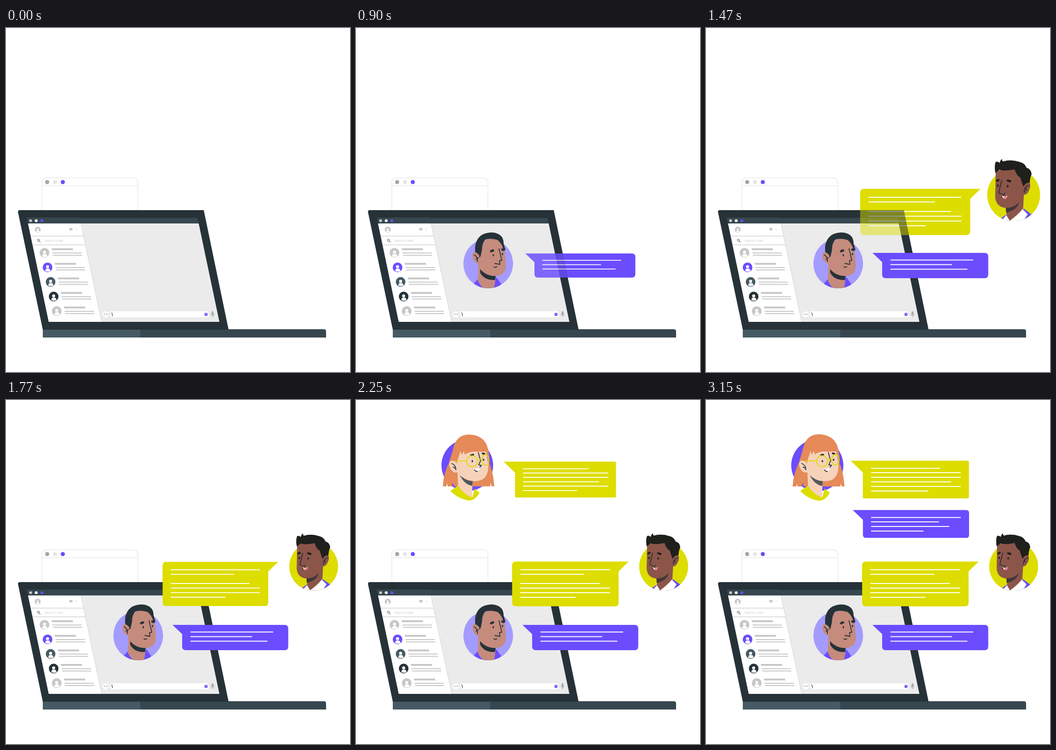
Write an HTML page that moves like this. It is 748 by 748 pixels and loops after 3.63 s.

```html
<!DOCTYPE html>
<html lang="en">
<head>
<meta charset="utf-8">
<title>Group chat</title>
<style>
  html, body { margin: 0; width: 100%; height: 100%; overflow: hidden; background: #fff; }
  svg { display: block; width: 100vw; height: 100vh; }
  .ink { fill: none; stroke: #263238; stroke-width: 1.8; stroke-linecap: round; stroke-linejoin: round; }
  .search { font: 7px "Open Sans", Lato, sans-serif; letter-spacing: .25px; fill: #c4c4c4; }
</style>
</head>
<body>
<svg viewBox="0 0 748 748">
  <defs>
    <clipPath id="lidClip"><path d="M26 400Q26 396 30 396H430L484 656H80Z"/></clipPath>
    <clipPath id="discA"><path d="M220 430H355V512H341.500A54 54 0 0 1 233.500 512H220Z"/></clipPath>
    <clipPath id="discB"><path d="M600 280H740V362H722A53 53 0 0 1 616 362H600Z"/></clipPath>

    <g id="faceA">
      <circle cx="287.500" cy="512" r="54" fill="#a49bff"/>
      <g clip-path="url(#discA)">
        <path d="M255 557L266 545L306 543L316 557L300 570H270Z" fill="#6b4dff"/>
        <path d="M266 508L265 549Q270 561 279 567H299Q303 557 303 547V528Z" fill="#c58b7c"/>
        <path d="M270 524Q282 539 304 539L302 548Q279 549 270 532Z" fill="#263238"/>
        <path d="M274 470Q283 455 305 457Q321 463 323 480L326 514Q327 536 307 539Q284 541 270 524L266 496Z" fill="#c58b7c"/>
        <path d="M260 492Q257 474 262 464Q270 445 295 444.500Q310 445 317 454Q321 460 321 469L325 482L321 485Q319 470 308 461Q293 456 281 460Q274 468 274 482L271 496L266 502Z" fill="#263238"/>
        <path d="M268 494Q261 486 255 488Q251 492 255 504Q260 513 268 512Z" fill="#c58b7c"/>
        <path class="ink" stroke-width="1.300" d="M257 493Q265 498 264 508M261 503L266 499"/>
        <path class="ink" d="M311 480L317 505L312 506L313 514L302 512"/>
        <path class="ink" stroke-width="1.300" d="M300 519Q303 522 306 519"/>
        <ellipse cx="296" cy="484.500" rx="4.800" ry="2.700" transform="rotate(-20 296 484.500)" fill="#263238"/>
        <ellipse cx="319.500" cy="482" rx="4" ry="2.500" transform="rotate(18 319.500 482)" fill="#263238"/>
        <ellipse cx="298.500" cy="494" rx="1.500" ry="2.500" fill="#263238"/>
        <ellipse cx="318.500" cy="491.500" rx="1.500" ry="2.500" fill="#263238"/>
      </g>
    </g>

    <g id="faceB">
      <circle cx="669" cy="362" r="53" fill="#dddd00"/>
      <g clip-path="url(#discB)">
        <path d="M642 410L656 400L690 390L706 402L690 418H650Z" fill="#6b4dff"/>
        <path d="M646 412L656 401L684 388L697 401L686 418H652Z" fill="#fff"/>
        <path d="M654 380L690 352L688 389Q678 402 661 414L655 404Z" fill="#8c5549"/>
        <path d="M653 387Q669 386 680 376Q677 389 665 394L654 398Z" fill="#40383a"/>
        <path d="M633 315L680 304L692 346Q689 364 680 376Q669 389 652 388Q634 386 632 367Z" fill="#8c5549"/>
        <path d="M632 318Q630 301 633 296Q637 294 641 298Q642 292 646 290Q645 294 648 295Q664 290 681 296Q691 298 695 308Q703 309 705 320Q702 327 701 339L688 345L682 327Q675 324 671 311Q649 315 641 312Z" fill="#1f1f1c"/>
        <path d="M688 346Q694 336 701 338Q705 345 697 358Q691 364 685 362Z" fill="#8c5549"/>
        <path class="ink" stroke-width="1.300" d="M699 343Q690 346 690 357M693 347L694 353"/>
        <path class="ink" d="M645 333L639 358L646 361M645 367L651 359"/>
        <path d="M645 363Q651 368 656 363Q656 370 651 370Q647 369 645 363Z" fill="#fff"/>
        <path d="M648 368Q654 363 656 366Q655 371 651 370Z" fill="#e87a91"/>
        <ellipse cx="659.500" cy="334" rx="5" ry="2.300" transform="rotate(16 659.500 334)" fill="#1f1f1c"/>
        <ellipse cx="637" cy="333" rx="4" ry="2.200" transform="rotate(-24 637 333)" fill="#1f1f1c"/>
        <ellipse cx="657" cy="344.500" rx="1.700" ry="2.500" fill="#1f1f1c"/>
        <ellipse cx="637.500" cy="343.500" rx="1.600" ry="2.500" fill="#1f1f1c"/>
      </g>
    </g>

    <g id="faceC">
      <circle cx="242" cy="142" r="56.500" fill="#6b4dff"/>
      <path d="M210 110Q216 75 245 74.500Q276 76 285 99Q291 116 290 136Q299 158 301 188H295L293 180L292 188H213L210 180L208 188H199L198 181L196 188H188.500Q190 160 202 136Z" fill="#e58a58"/>
      <path d="M220 148L222 189Q235 207 252 212L254 172Z" fill="#f6d2bb"/>
      <path d="M205 198L222 186Q233 205 253 212L258 193L269 202Q259 219 246 219Q223 216 205 198Z" fill="#dddd00"/>
      <path d="M225 162Q237 175 254 176L253 187Q235 184 225 162Z" fill="#55585a"/>
      <path d="M222 112H283L288 140Q289 164 275 173Q263 179 245 175Q225 168 218 152Z" fill="#f6d2bb"/>
      <path d="M219 136L225 118L228 107L229 120L235 110L236 118Q257 109 268 109L269 113L270 108L278 110L278 106Q284 110 286 119Q289 102 277 88Q248 77 222 98Q209 121 211 140Z" fill="#e58a58"/>
      <path d="M219 137Q209 128 204 134Q200 141 207 152Q213 160 221 157Z" fill="#f6d2bb"/>
      <path class="ink" stroke-width="1.300" d="M208 138Q217 141 217 152M211 146L217 149"/>
      <path class="ink" d="M266 114L271 132L267 141L273 142L268 148"/>
      <path d="M257 149Q264 151 269 146Q271 153 264 155Q259 155 257 149Z" fill="#fff"/>
      <path class="ink" stroke-width="1.200" d="M258 152Q260 156 264 155"/>
      <ellipse cx="252.500" cy="119.500" rx="4.500" ry="2.300" transform="rotate(-14 252.500 119.500)" fill="#263238"/>
      <ellipse cx="277.500" cy="116.500" rx="4" ry="2.200" transform="rotate(18 277.500 116.500)" fill="#263238"/>
      <ellipse cx="253" cy="133" rx="1.600" ry="2.500" fill="#263238"/>
      <ellipse cx="277.500" cy="130" rx="1.600" ry="2.500" fill="#263238"/>
      <g fill="none" stroke="#dddd00" stroke-width="1.900">
        <circle cx="252.500" cy="133" r="12"/>
        <ellipse cx="281.500" cy="130" rx="8" ry="11.500"/>
        <path d="M214 133L240 132M264 130Q269 127 274 130"/>
      </g>
    </g>
  </defs>

  <g id="ghost">
    <path d="M78 400V336Q78 326 88 326H277Q287 326 287 336V400M78 343H287" fill="#fff" stroke="#efefef" stroke-width="2"/>
    <circle cx="89.500" cy="335" r="4.500" fill="#a6a6a6"/>
    <circle cx="106.500" cy="335" r="4.500" fill="#e6e6e6"/>
    <circle cx="123.500" cy="335" r="4.500" fill="#6b4dff"/>
  </g>

  <g id="under"></g>

  <g id="laptop">
    <path d="M80 655H691Q696 655 696 660V673H80Z" fill="#37474f"/>
    <path d="M80 655H292V673H80Z" fill="#455a64"/>
    <path d="M26 400Q26 396 30 396H430L484 656H80Z" fill="#263238"/>
    <path d="M45 412H160V413H416.500L419 425H48Z" fill="#37474f"/>
    <path d="M48 425H419L464 639H93Z" fill="#ebebeb"/>
    <path d="M48 425H163L208 639H93Z" fill="#fff"/>
    <path d="M163 425L208 639" stroke="#b5b5b5" stroke-width=".8" stroke-dasharray="2 1"/>
    <path d="M54 452.500H168.500M58 471.500H172.500" stroke="#d2d2d2" stroke-width="1.300"/>
    <ellipse cx="53.500" cy="419" rx="3.200" ry="2.900" fill="#c7c7c7"/>
    <ellipse cx="65.700" cy="419" rx="3.200" ry="2.900" fill="#fff"/>
    <ellipse cx="78" cy="419" rx="3.200" ry="2.900" fill="#6b4dff"/>
    <path d="M138 435H144.500V439.500H140.500L139 441V439.500H138Z" fill="#b9b9b9"/>
    <path d="M139.500 437.200H143.500" stroke="#fff" stroke-width=".8"/>
    <path d="M151.500 434.500L153 441" stroke="#c7c7c7" stroke-width="1.200" stroke-dasharray="1.200 1.400"/>
    <circle cx="70.300" cy="461.300" r="2.200" fill="none" stroke="#777" stroke-width="1.100"/>
    <path d="M72 463L74.800 466" stroke="#777" stroke-width="1.500"/>
    <text class="search" x="84" y="465">Search chat</text>
    <g id="contacts"></g>
    <ellipse cx="217" cy="622.500" rx="7" ry="6.500" fill="#fff"/>
    <path d="M213 622.300H222" stroke="#8a8a8a" stroke-width="1.700" stroke-dasharray="1.800 1.800"/>
    <path d="M228 616H437Q439 616 439.500 618L441 627Q441 629 439 629H230Q228 629 227.500 627L226 618Q226 616 228 616Z" fill="#fff"/>
    <path d="M230 618.500L231.700 626.500" stroke="#263238" stroke-width="1.200"/>
    <circle cx="435" cy="622.800" r="3.500" fill="#6b4dff"/>
    <path d="M434 621L436.500 622.800L434.500 624.500" fill="none" stroke="#fff" stroke-width=".8"/>
    <rect x="447" y="616" width="4.200" height="8.500" rx="2.100" fill="#a6a6a6"/>
    <path d="M445.500 621.500Q446 626 449.500 626Q453 626 452.500 621.500M449.500 626V629" fill="none" stroke="#a6a6a6"/>
  </g>

  <g id="over"></g>
</svg>

<script>
const LOOP = 3630, STEP = 30, POP = 400, CUTOFF = 0.3;
const PURPLE = '#6b4dff', YELLOW = '#dddd00';
const byId = id => document.getElementById(id);

function add(parent, tag, attrs) {
  const el = document.createElementNS('http://www.w3.org/2000/svg', tag);
  for (const k in attrs) el.setAttribute(k, attrs[k]);
  return parent.appendChild(el);
}

// Sidebar avatars
function avatar(parent, x, y, r, fill) {
  const g = add(parent, 'g', { transform: `translate(${x} ${y}) scale(${r / 10.5})` });
  add(g, 'circle', { r: 10.5, fill });
  add(g, 'circle', { cx: 0, cy: -1.3, r: 3.3, fill: '#fff' });
  add(g, 'path', { d: 'M-5 8Q-5 2.500 -1 2.500H2Q6 3 6 8Q1 10.500 -5 8Z', fill: '#fff' });
}

const contacts = byId('contacts');
avatar(contacts, 69, 438.5, 6.5, '#c7c7c7');
['#c7c7c7', PURPLE, '#455a64', '#263238', '#c7c7c7'].forEach((fill, i) => {
  const g = add(contacts, 'g', { transform: `translate(${6.65 * i} ${31.7 * i})` });
  avatar(g, 83.7, 488.7, 10.5, fill);
  add(g, 'path', { d: 'M99 479H145L146 483H100Z', fill: '#c7c7c7' });
  add(g, 'path', { d: 'M101 489.200H164.500M102 494.200H165.500', stroke: '#c7c7c7', 'stroke-width': 2 });
});

// Speech bubbles: body box, tail length and height, corner radius, text rows [y, x2]
function bubble(id, fill, [x, y, x2, y2], tail, drop, r, textX, rows) {
  const g = add(document.querySelector('defs'), 'g', { id });
  const right = tail > 0;
  const top = right
    ? `M${x + r} ${y}H${x2 + tail}L${x2} ${y + drop}`
    : `M${x + tail} ${y}H${x2 - r}Q${x2} ${y} ${x2} ${y + r}`;
  const bottom = `V${y2 - r}Q${x2} ${y2} ${x2 - r} ${y2}H${x + r}Q${x} ${y2} ${x} ${y2 - r}`;
  const left = right ? `V${y + r}Q${x} ${y} ${x + r} ${y}Z` : `V${y + drop}Z`;
  add(g, 'path', { d: top + bottom + left, fill });
  add(g, 'path', {
    d: rows.map(([ry, end]) => `M${textX} ${ry}H${end}`).join(''),
    stroke: '#fff', 'stroke-width': 1.9
  });
}

bubble('sayA', PURPLE, [383, 489, 613.5, 544], -21, 20, 8, 401,
  [[504.5, 581], [514.5, 535], [524.5, 568.5]]);
bubble('sayB', YELLOW, [339.5, 351.5, 571, 448.5], 21.5, 21, 8, 357,
  [[369, 552.5], [379, 496.5], [399, 530.5], [409, 552.5], [419, 552.5], [429, 477.5]]);
bubble('sayC', YELLOW, [341, 132, 571.5, 214], -26, 25.5, 3, 359,
  [[148.5, 509], [158, 554], [168, 554], [178, 533], [188, 554], [198, 483]]);
bubble('sayD', PURPLE, [341.5, 239.5, 572, 299.5], -22, 21, 6, 359,
  [[255.5, 554], [265, 506.5], [275, 529], [285, 473]]);

// id, start time, scaling centre
const parts = [
  ['faceA', 495, 287.5, 505], ['sayA', 792, 487.5, 516.5],
  ['faceB', 1408, 669, 352.5], ['sayB', 1424, 466, 400],
  ['faceC', 2063, 243, 146.5], ['sayC', 2078, 443.5, 173],
  ['sayD', 2699, 446, 269.5]
].map(([id, start, x, y]) => {
  const href = '#' + id;
  const under = add(byId('under'), 'use', { href });
  const mask = add(byId('over'), 'g', {});
  return { start, x, y, under, mask, over: add(mask, 'use', { href }) };
});

// cubic-bezier(.215, .61, .355, 1)
function ease(x) {
  if (x <= 0) return 0;
  if (x >= 1) return 1;
  const curve = (u, a, b) => 3 * (1 - u) ** 2 * u * a + 3 * (1 - u) * u * u * b + u ** 3;
  let lo = 0, hi = 1;
  for (let i = 0; i < 24; i++) {
    const mid = (lo + hi) / 2;
    if (curve(mid, 0.215, 0.355) < x) lo = mid; else hi = mid;
  }
  return curve(lo, 0.61, 1);
}

// Bounce through evenly spaced sizes
const SIZES = [0.3, 1.1, 0.9, 1.03, 0.97, 1];
function bounce(p) {
  if (p >= 1) return 1;
  const i = Math.floor(p * 5);
  return SIZES[i] + (SIZES[i + 1] - SIZES[i]) * ease(p * 5 - i);
}

// Fading blends only over the lid; on the bare stage parts are either solid or absent.
function draw(time) {
  const t = Math.floor(time % LOOP / STEP) * STEP;
  for (const { start, x, y, under, mask, over } of parts) {
    const p = Math.max(0, (t - start) / POP);
    const alpha = ease(p / 0.6);
    const move = `translate(${x} ${y}) scale(${bounce(p)}) translate(${-x} ${-y})`;
    under.setAttribute('transform', move);
    over.setAttribute('transform', move);
    under.setAttribute('visibility', alpha >= CUTOFF ? 'visible' : 'hidden');
    mask.setAttribute('opacity', alpha);
    if (alpha < 1) mask.setAttribute('clip-path', 'url(#lidClip)');
    else mask.removeAttribute('clip-path');
  }
}

const begin = performance.now();
function tick() {
  draw(performance.now() - begin);
  requestAnimationFrame(tick);
}
tick();
</script>
</body>
</html>
```
